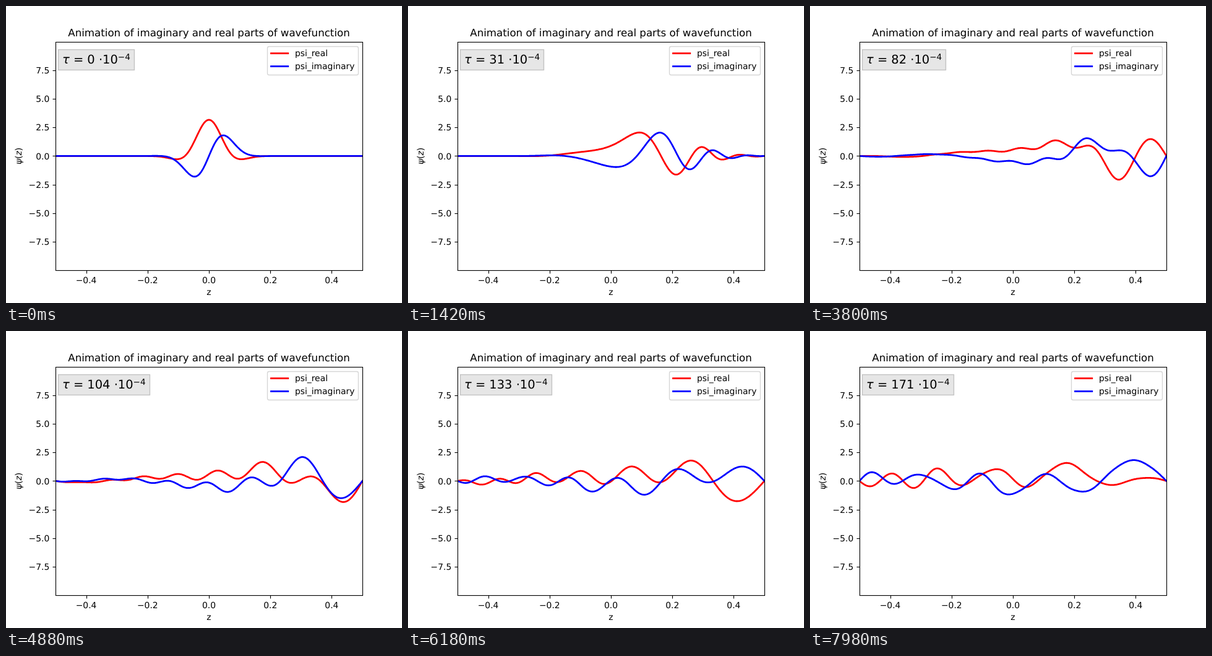
An HTML page that plays this animation: 640x480 px, repeating every 8 s.

```html
<!DOCTYPE html>
<html lang="en">
<head>
<meta charset="utf-8">
<title>Wavefunction</title>
<style>
  html, body { margin: 0; width: 100%; height: 100%; overflow: hidden; background: #fff; }
  svg { display: block; width: 640px; height: 480px; }
  text { font: 13.889px "DejaVu Sans", sans-serif; text-rendering: geometricPrecision; }
  .mid { text-anchor: middle; }
  .end { text-anchor: end; }
  .it { font-style: italic; }
  #title { font-size: 16.667px; }
  #tau { font-size: 19.444px; }
  #tau .sup { font-size: 13.611px; }
  .axis { fill: none; stroke: #000; stroke-width: 1.11; }
  .wave { fill: none; stroke-width: 2.78; stroke-linejoin: round; stroke-linecap: square; }
  .re { stroke: #f00; }
  .im { stroke: #00f; }
</style>
</head>
<body>
<svg viewBox="0 0 640 480">
  <clipPath id="plot"><rect x="80" y="57.6" width="496" height="369.6"/></clipPath>
  <g clip-path="url(#plot)">
    <path id="re" class="wave re"/>
    <path id="im" class="wave im"/>
  </g>
  <g id="ticks"></g>
  <rect class="axis" x="80.5" y="58.5" width="496" height="369"/>

  <rect id="box" x="84.5" y="70.5" height="33" fill="rgba(128,128,128,.2)" stroke="rgba(0,0,0,.2)" stroke-width="1.39"/>
  <text id="tau" x="91" y="93.3"><tspan class="it">τ</tspan> = <tspan id="count">0</tspan> ·10<tspan class="sup" dy="-6.6">−4</tspan></text>

  <rect x="422.5" y="65.5" width="147" height="46" rx="2.78" fill="#fff" fill-opacity=".8" stroke="#ccc" stroke-opacity=".8" stroke-width="1.39"/>
  <path class="wave re" d="M428.5 76.5h27.3"/>
  <path class="wave im" d="M428.5 97.5h27.3"/>
  <text x="466.9" y="81">psi_real</text>
  <text x="466.9" y="102">psi_imaginary</text>

  <text id="title" class="mid" x="328" y="49">Animation of imaginary and real parts of wavefunction</text>
  <text class="mid" x="328" y="467">z</text>
  <text class="mid" transform="translate(25.2 242.4) rotate(-90)"><tspan class="it">ψ</tspan>(<tspan class="it">z</tspan>)</text>
</svg>
<script>
const LOOP = 8000, MODES = 48, POINTS = 496, K0 = 20;
const $ = id => document.getElementById(id);
const px = z => 328 + 496 * z;
const py = v => 242.4 - 18.48 * v;
const snap = v => Math.round(v) + 0.5;
const label = v => v.toFixed(1).replace('-', '−');

let ticks = '';
for (let i = -2; i <= 2; i++) {
  const x = px(i / 5);
  ticks += `<path class="axis" d="M${snap(x)} 427.5v5"/><text class="mid" x="${x}" y="448">${label(i / 5)}</text>`;
}
for (let i = -3; i <= 3; i++) {
  const y = py(i * 2.5);
  ticks += `<path class="axis" d="M80.5 ${snap(y)}h-5"/><text class="end" x="70.3" y="${Math.round(y + 5.2)}">${label(i * 2.5)}</text>`;
}
$('ticks').innerHTML = ticks;

// Gaussian packet with wave number K0, expanded in the sine modes of a box with hard walls.
const gauss = q => Math.exp(-q * q / (200 * Math.PI));
const modes = Array.from({ length: MODES }, (_, i) => {
  const k = (i + 1) * Math.PI, plus = gauss(K0 + k), minus = gauss(K0 - k);
  const scale = Math.sqrt(0.2);
  return {
    k,
    re: scale * Math.sin(k / 2) * (plus + minus),
    im: -scale * Math.cos(k / 2) * (plus - minus),
    shape: Array.from({ length: POINTS + 1 }, (_, j) => Math.sin(k * j / POINTS))
  };
});

function drawWave(tau) {
  const now = modes.map(({ k, re, im, shape }) => {
    const c = Math.cos(k * k * tau), s = Math.sin(k * k * tau);
    return { re: re * c + im * s, im: im * c - re * s, shape };
  });
  for (const part of ['re', 'im']) {
    let d = '';
    for (let j = 0; j <= POINTS; j++) {
      let v = 0;
      for (const m of now) v += m[part] * m.shape[j];
      d += `${j ? 'L' : 'M'}${px(j / POINTS - 0.5).toFixed(2)} ${py(v).toFixed(2)}`;
    }
    $(part).setAttribute('d', d);
  }
}

// Every three steps take 20 + 100 + 20 ms.
function stepAt(ms) {
  const rest = ms % 140;
  return 3 * Math.floor(ms / 140) + (rest >= 20) + (rest >= 120);
}

let shown = -1;
function render() {
  const step = stepAt(performance.now() % LOOP);
  if (step !== shown) {
    shown = step;
    drawWave(step * 1e-4);
    $('count').textContent = step;
    $('box').setAttribute('width', Math.round(123 + 12.37 * (String(step).length - 1)));
  }
  requestAnimationFrame(render);
}
render();
</script>
</body>
</html>
```
